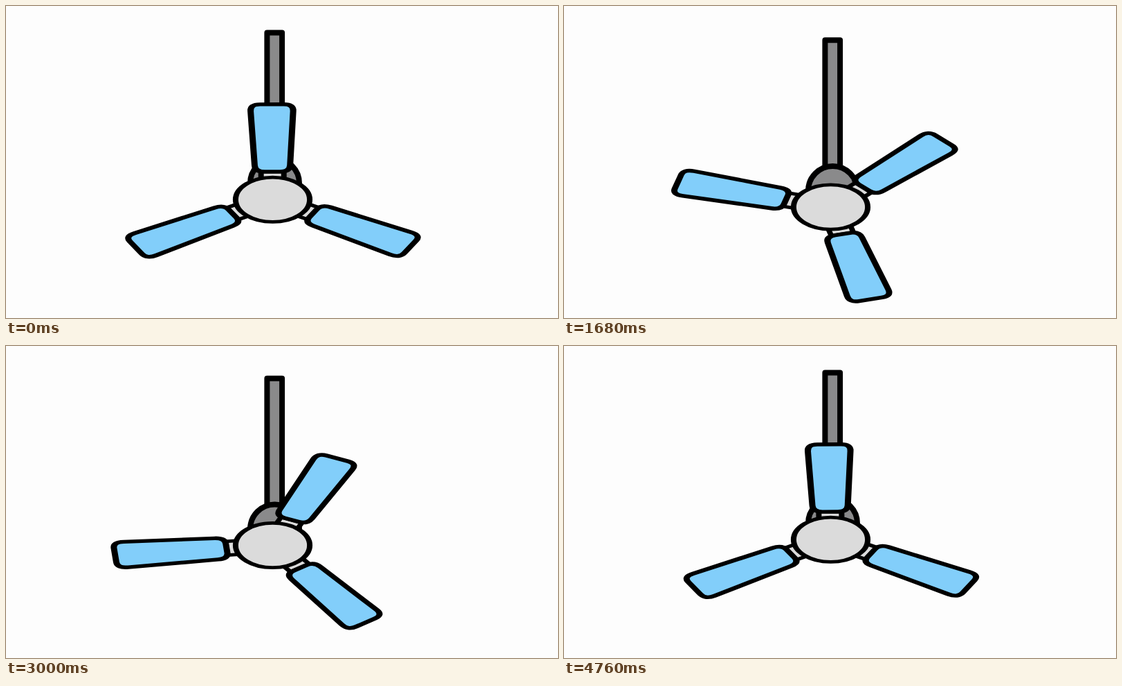
Recreate the animation shown at these times as an HTML page. Size 798 px wide and 450 px high, loop 4800 ms.

```html
<!DOCTYPE html>
<html lang="en">
<head>
<meta charset="utf-8">
<title>Ceiling fan</title>
<style>
  html, body { margin: 0; width: 100%; height: 100%; overflow: hidden; background: #fdfdfd; }
  svg { display: block; width: 100%; height: 100%; }
  #fan { stroke: #000; stroke-width: 8; stroke-linejoin: round; }
  .metal { fill: #8a8a8b; }
  .pale { fill: #dbdbdb; }
  .blade { fill: #82cefa; stroke-width: 9; }
</style>
</head>
<body>
<svg viewBox="0 0 798 450">
  <defs>
    <g id="arm">
      <path class="pale" d="M-16.5 -40V-67H16.5V-40Z"/>
      <path class="blade" d="M-17 -229H17Q31.5 -229 30.8 -213L25.6 -82Q25 -67 11 -67H-11Q-25 -67 -25.6 -82L-30.8 -213Q-31.5 -229 -17 -229Z"/>
    </g>
  </defs>
  <g id="fan">
    <rect class="metal" x="-8.1" y="-240.7" width="21.7" height="215"/>
    <circle class="metal" cx="3" cy="-23.5" r="35.5"/>
    <g transform="scale(1 .6)">
      <g id="rotor">
        <use href="#arm"/>
        <use href="#arm" transform="rotate(120)"/>
        <use href="#arm" transform="rotate(240)"/>
      </g>
      <circle class="pale" r="53.6"/>
    </g>
  </g>
</svg>
<script>
  const LOOP = 4800, STEP = 40;
  const HUB = { x: 385.5, y: 279.2 };
  const DROP = 16.7;          // vertical travel of the bob
  const TURN = 4 * 360;       // degrees per loop
  const START = -0.3;

  const fan = document.getElementById('fan');
  const rotor = document.getElementById('rotor');
  const smooth = u => u * u * (3 - 2 * u);

  function draw(ms) {
    const t = Math.floor((ms % LOOP) / STEP) * STEP / LOOP;
    const phase = (t * 2) % 1;
    const bob = smooth(1 - Math.abs(1 - 2 * phase));
    fan.setAttribute('transform', `translate(${HUB.x} ${HUB.y + DROP * bob})`);
    rotor.setAttribute('transform', `rotate(${START + TURN * smooth(t)})`);
  }

  let begin;
  function tick(now) {
    begin ??= now;
    draw(now - begin);
    requestAnimationFrame(tick);
  }
  draw(0);
  requestAnimationFrame(tick);
</script>
</body>
</html>
```
